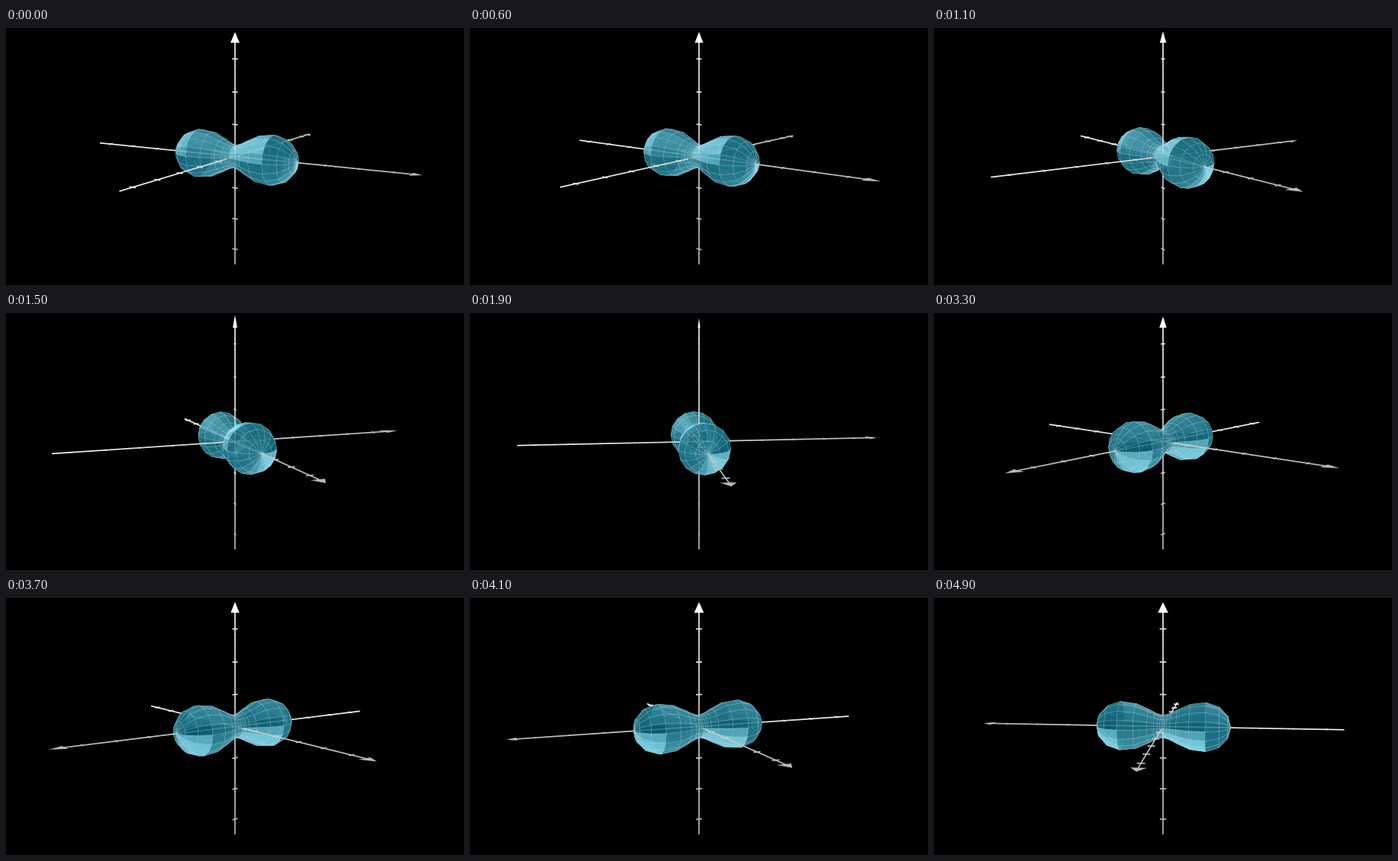
Animation of 600 by 337 pixels, one loop 5000 ms. Source, as a matplotlib script:

```python
import numpy as np
import matplotlib.pyplot as plt
from matplotlib.animation import FuncAnimation
from matplotlib.collections import PolyCollection

WIDTH, HEIGHT, DPI = 600, 337, 100
FRAMES, INTERVAL = 50, 100
UNIT = WIDTH * 9 / 128          # pixels per scene unit
FOCAL = 20
TILT = np.radians(80)
LIGHT = np.array([-7, -9, 10])
BLUE = np.array([28, 117, 138]) / 255
OPACITY = 0.75
MESH = (0.78, 0.88, 0.90, 0.45)
CLEAR = (0, 0, 0, 0)
AXIS_WIDTH, MESH_WIDTH = 1.7, 0.42   # pixels


def camera_angle(frame):
    """Degrees: a short settling move, then a steady turn."""
    if frame < 3:
        return 27.8 + 2.2 * ((3 - frame) / 3) ** 2
    return 27.8 + np.degrees(0.06) * (frame - 3)


def project(points, angle):
    """Return screen positions and depth towards the camera."""
    x, y, z = points.T
    c, s = np.cos(angle), np.sin(angle)
    right, near = x * c + y * s, x * s - y * c
    up = z * np.sin(TILT) - near * np.cos(TILT)
    depth = near * np.sin(TILT) + z * np.cos(TILT)
    scale = UNIT * FOCAL / (FOCAL - depth)
    return np.column_stack([WIDTH / 2 + right * scale, HEIGHT / 2 + up * scale]), depth


def outset(triangle, distance=AXIS_WIDTH / 2, miter_limit=10):
    """Grow a screen triangle as a mitred outline would."""
    sides = np.linalg.norm(np.roll(triangle, -1, 0) - np.roll(triangle, 1, 0), axis=1)
    incenter = sides @ triangle / sides.sum()
    a, b = triangle[1] - triangle[0], triangle[2] - triangle[0]
    inradius = max(abs(a[0] * b[1] - a[1] * b[0]) / sides.sum(), 1e-6)
    arms = triangle - incenter
    reach = np.linalg.norm(arms, axis=1, keepdims=True)
    miter = reach / inradius
    growth = distance * np.where(miter < miter_limit, miter, 1)
    return triangle + arms / reach * growth


def oval_point(t, v, a=1.455, b=1.5):
    """Cassini oval turned about the x axis."""
    r = np.sqrt(a**2 * np.cos(2 * t) + np.sqrt(b**4 - (a**2 * np.sin(2 * t)) ** 2))
    return r * np.array([np.cos(t), np.sin(t) * np.cos(v), np.sin(t) * np.sin(v)])


def quad_points(t0, t1, v0, v1):
    corners = (t0, v0), (t1, v0), (t1, v1), (t0, v1)
    return np.array([oval_point(t, v) for t, v in corners])


def shaded(color, quad):
    normal = np.cross(quad[2] - quad[0], quad[3] - quad[1])
    to_light = LIGHT - quad.mean(axis=0)
    cosine = normal @ to_light / np.linalg.norm(normal) / np.linalg.norm(to_light)
    glow = 0.5 * cosine**3
    return np.clip(color + (glow if glow > 0 else glow / 2), 0, 1)


items = []   # (points, depth centre, face colour, edge colour, line width)


def add_item(points, face, edge, width):
    points = np.array(points)
    center = (points.min(axis=0) + points.max(axis=0)) / 2
    items.append((points, center, face, edge, width * 72 / DPI))


def add_surface(patches=12, rings=3, slices=8):
    """Each patch has one shade and is cut into rings by the mesh."""
    bounds = np.linspace(0, 2 * np.pi, patches + 1)
    v = np.linspace(0, np.pi, slices + 1)
    for t0, t1 in zip(bounds, bounds[1:]):
        t = np.linspace(t0, t1, rings + 1)
        for v0, v1 in zip(v, v[1:]):
            color = shaded(BLUE, quad_points(t0, t1, v0, v1))
            for start, end in zip(t, t[1:]):
                quad = quad_points(start, end, v0, v1)
                add_item([*quad, quad[0]], (*color, OPACITY), MESH, MESH_WIDTH)


def add_axis(direction, side, half, bright_end, tip_gray, pieces=20):
    direction, side = np.array(direction, float), np.array(side, float)

    def gray(s):
        along = (s + half) / (2 * half)
        level = 0.70 + 0.24 * (along if bright_end else 1 - along)
        return (level, level, level, 1)

    stops = np.linspace(-half, half, pieces + 1)
    for start, end in zip(stops, stops[1:]):
        overlap = min(end + 0.02, half)
        add_item([direction * start, direction * overlap], CLEAR, gray(start), AXIS_WIDTH)
    for n in range(-int(half), int(half) + 1):
        add_item([direction * n - side * 0.1, direction * n + side * 0.1],
                 CLEAR, gray(n), AXIS_WIDTH)
    base, apex = direction * half, direction * (half + 0.25)
    add_item([base + side * 0.125, apex, base - side * 0.125],
             (tip_gray,) * 3 + (1,), CLEAR, 0)


add_axis((1, 0, 0), (0, 1, 0), 5.5, False, 0.72)
add_axis((0, 1, 0), (1, 0, 0), 5.5, False, 0.72)
add_axis((0, 0, 1), (1, 0, 0), 3.5, True, 1.0)
add_surface()

shapes, centers, faces, edges, widths = zip(*items)
centers, faces, edges, widths = map(np.array, (centers, faces, edges, widths))
splits = np.cumsum([len(s) for s in shapes])[:-1]
all_points = np.concatenate(shapes)

fig = plt.figure(figsize=(WIDTH / DPI, HEIGHT / DPI), dpi=DPI, facecolor="black")
ax = fig.add_axes([0, 0, 1, 1])
ax.set(xlim=(0, WIDTH), ylim=(0, HEIGHT))
ax.axis("off")
scene = PolyCollection([], closed=False, joinstyle="bevel", capstyle="butt")
ax.add_collection(scene, autolim=False)


def draw(frame):
    angle = np.radians(camera_angle(frame))
    order = np.argsort(project(centers, angle)[1], kind="stable")
    polygons = np.split(project(all_points, angle)[0], splits)
    polygons = [outset(p) if len(p) == 3 else p for p in polygons]
    scene.set_verts([polygons[i] for i in order], closed=False)
    scene.set_facecolor(faces[order])
    scene.set_edgecolor(edges[order])
    scene.set_linewidth(widths[order])
    return [scene]


animation = FuncAnimation(fig, draw, frames=FRAMES, interval=INTERVAL,
                          repeat=True, repeat_delay=0)
plt.show()
```
